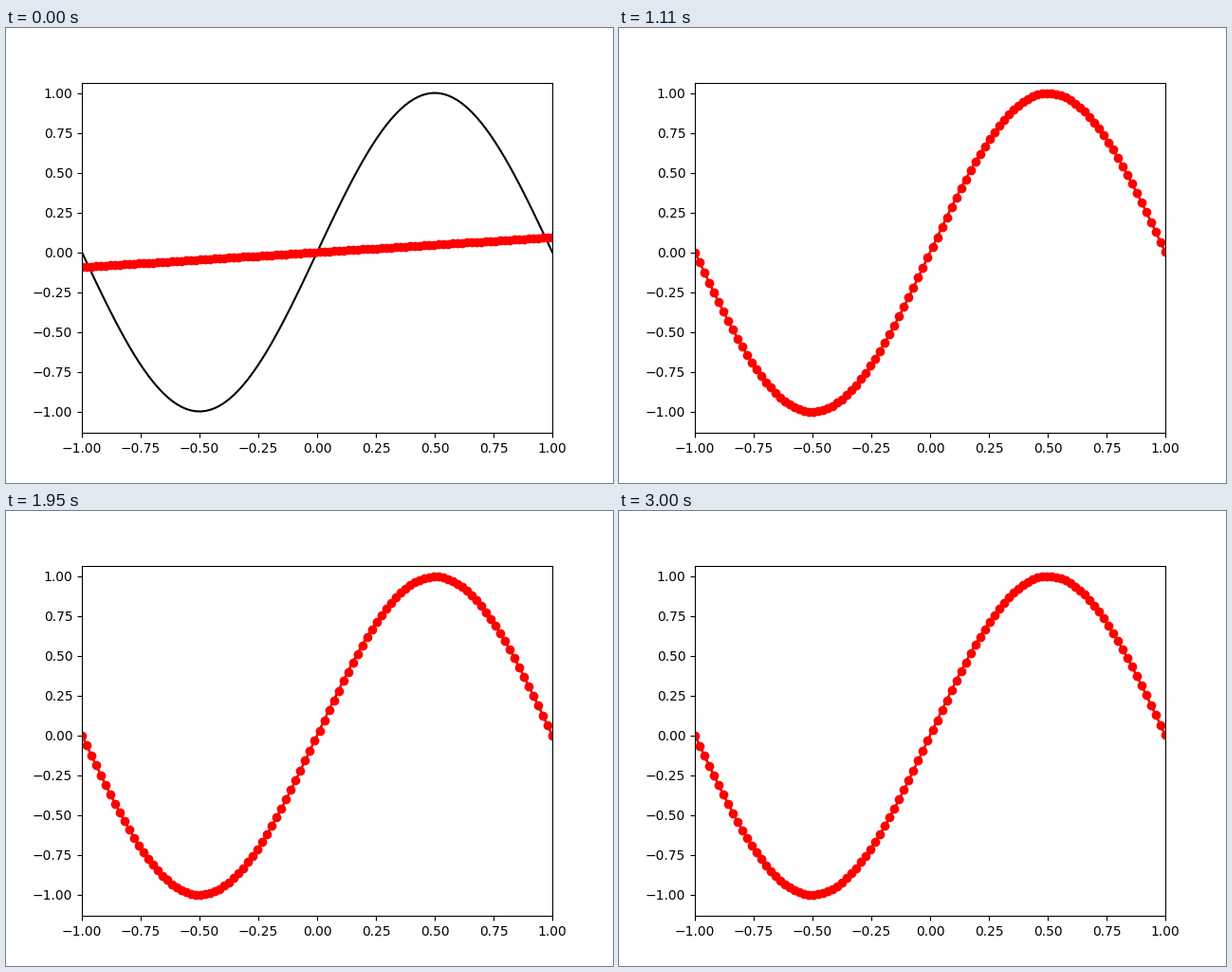
A matplotlib script that plays this animation: 640x480 px, repeating every 3030 ms.

```python
import numpy as np
import matplotlib.pyplot as plt
from matplotlib.animation import FuncAnimation

FRAMES = 101
INTERVAL = 30

x = np.linspace(-1, 1, 100)
target = np.sin(np.pi * x)


def smoothstep(k, start, end):
    u = np.clip((k - start) / (end - start), 0, 1)
    return u * u * (3 - 2 * u)


def estimate(k):
    """Fitted curve after k updates: a steepening line that bends into the sine."""
    slope = 1.16 - 1.066 * np.exp(-k * k / 6)
    bend = smoothstep(k, 4, 14)
    # small residual jitter of the optimiser
    shift = 0.002 * np.sin(2.3 * k)
    tilt = 0.002 * np.sin(1.7 * k + 0.5)
    jitter = shift + tilt * x
    return (1 - bend) * slope * x + bend * (target + jitter)


fig, ax = plt.subplots(figsize=(6.4, 4.8), dpi=100)
ax.plot(x, target, "k-")
fit, = ax.plot(x, estimate(0), "ro-")
ax.set_xlim(-1, 1)
ax.set_ylim(-1.135, 1.065)


def update(k):
    fit.set_ydata(estimate(k))
    return fit,


anim = FuncAnimation(fig, update, frames=FRAMES, interval=INTERVAL, repeat=True)
plt.show()
```
